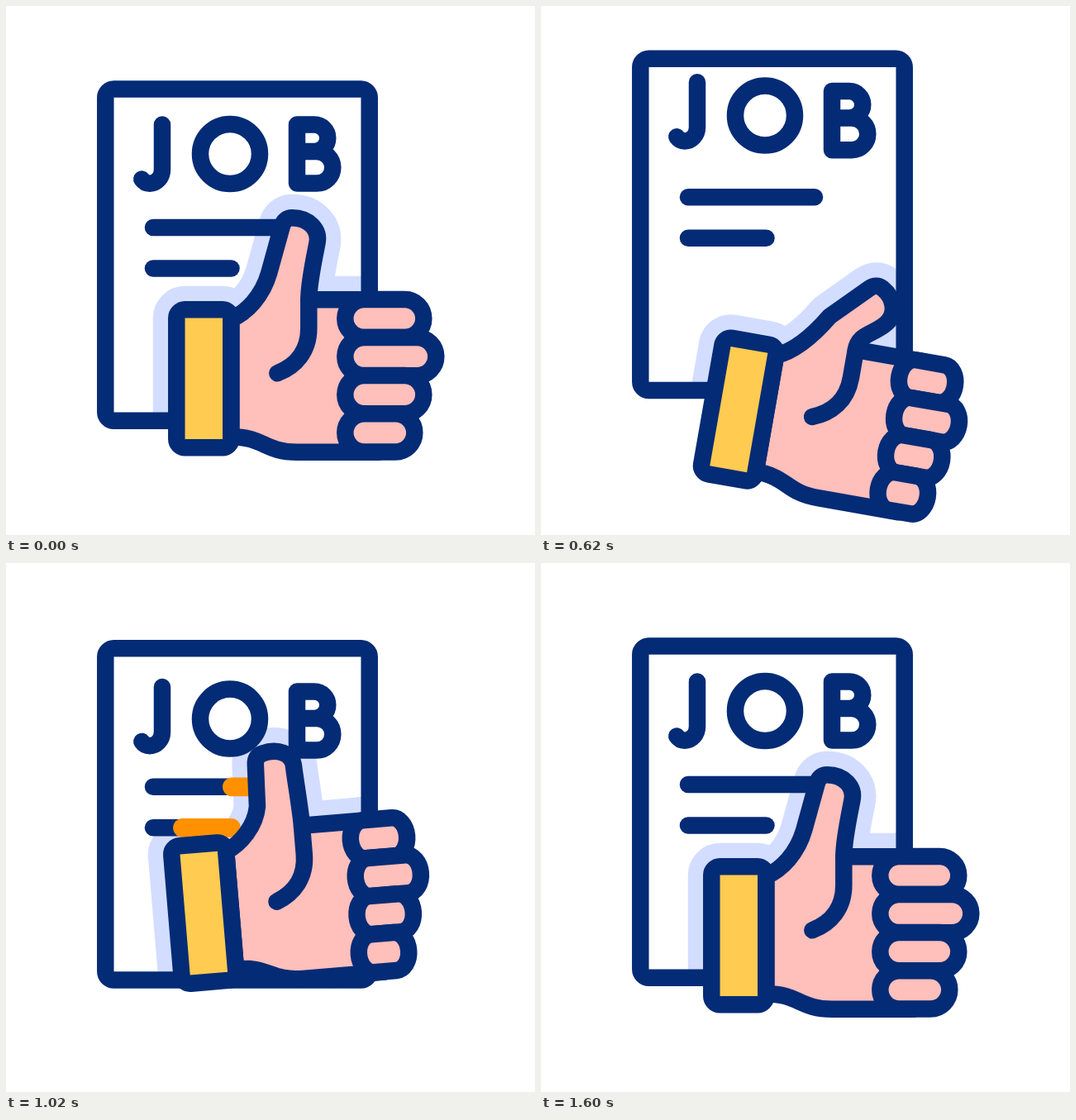
Animation of 640x640 px, one loop 1.96 s. Source, as an HTML page with a canvas:

```html
<!DOCTYPE html>
<html lang="en">
<head>
<meta charset="utf-8">
<title>Job approved</title>
<style>
  html, body { margin: 0; width: 100%; height: 100%; overflow: hidden; background: #fff; }
  canvas { display: block; width: 640px; height: 640px; }
</style>
</head>
<body>
<canvas id="stage" width="640" height="640"></canvas>
<script>
const ctx = document.getElementById('stage').getContext('2d');
const LOOP = 1960, STEP = 20, LINE = 20.5, HALO = 57;
const NAVY = '#042b76', PINK = '#ffbfba', YELLOW = '#ffcb50', PALE = '#d3ddff', ORANGE = '#ff9100';

function ease(x) {
  x = Math.min(1, Math.max(0, x));
  return x * x * (3 - 2 * x);
}

// Starts at rest, eases to each peak in turn and comes back to rest
function swing(t, beats, peaks) {
  let value = 0;
  for (let i = 0; i < beats.length - 1; i++) {
    const step = (peaks[i] || 0) - (peaks[i - 1] || 0);
    value += step * ease((t - beats[i]) / (beats[i + 1] - beats[i]));
  }
  return value;
}

const SHEET_BEATS = [260, 420, 660, 900, 1180, 1450];
const HAND_BEATS = [400, 640, 943, 1202, 1600];
const TILT_BEATS = [366, 600, 880, 1180, 1580];

const sheetY = t => swing(t, SHEET_BEATS, [18, -41, 18, -20.5]);
const letterY = t => swing(t, SHEET_BEATS, [9, -16.5, 10, -6.3]);
const handY = t => swing(t, HAND_BEATS, [38, -41.5, 25.6]);
const thumbBend = t => swing(t, HAND_BEATS, [30, -25, 21.5]);
const handTilt = t => swing(t, TILT_BEATS, [10.3, -14.5, 7.1]);
const fistWidth = t => 1 - 0.28 * (ease((t - 320) / 240) - ease((t - 1200) / 360));
const rad = deg => deg * Math.PI / 180;

function stroke(path, color = NAVY, width = LINE) {
  ctx.strokeStyle = color;
  ctx.lineWidth = width;
  ctx.stroke(path);
}

function shape(path, fill) {
  ctx.fillStyle = fill;
  ctx.fill(path);
  stroke(path);
}

function bar(x0, x1, y, color, width) {
  stroke(new Path2D(`M${x0} ${y}H${x1}`), color, width);
}

// Half the line width as radius: round outside, square inside
function box(x, y, w, h) {
  const path = new Path2D();
  path.roundRect(x, y, w, h, LINE / 2);
  return path;
}

const sheet = box(120.3, 100.5, 319.4, 401.2);
const letters = [
  'M189 143.5V198C189 207.5 182 214.7 174 214.7C169 214.7 166 212 164.3 209.5',
  'M307 179A36 36 0 1 1 235 179A36 36 0 1 1 307 179Z',
  'M352 176V143.5H373A16.2 16.2 0 0 1 373 176H352V214.6H376A19.3 19.3 0 0 0 376 176'
].map(d => new Path2D(d));

// Hand parts are relative to the middle of the cuff
const HAND = { x: 239.3, y: 450.8 };
const cuff = box(-33, -83.5, 66, 167);
const crease = new Path2D('M127 -95V-61C127 -33 111 -15 89 -6.5');

function palmPath(bend) {
  const c = Math.cos(rad(bend)), s = Math.sin(rad(bend));
  const len = 1 + Math.min(0, bend) * 0.008;
  // Turns a point of the thumb around its joint
  const p = (x, y) => {
    const dx = x - 88, dy = (y + 110) * len;
    return [88 + dx * c - dy * s, -110 + dx * s + dy * c];
  };
  const path = new Path2D();
  path.moveTo(33, -72);
  path.bezierCurveTo(52, -80, 71, -100, ...p(79, -128));
  path.lineTo(...p(94.5, -184));
  path.quadraticCurveTo(...p(97.5, -194.5), ...p(107, -194.5));
  path.bezierCurveTo(...p(126, -194.5), ...p(141, -181), ...p(137, -163));
  path.bezierCurveTo(...p(133, -143), 127, -115, 127, -95.5);
  path.lineTo(212, -95.5);
  path.lineTo(212, 89);
  path.lineTo(113, 89);
  path.bezierCurveTo(73, 89, 73, 70.5, 33, 70.5);
  path.closePath();
  return path;
}

// All fingers start at the same left edge and are squeezed about their middles
function fingerPath(half, i, squeeze) {
  const x = 171 + half, y = -72.8 + 46.1 * i, r = 23.1;
  const rx = r * squeeze, w = half * squeeze - rx;
  const path = new Path2D();
  path.ellipse(x + w, y, rx, r, 0, -Math.PI / 2, Math.PI / 2);
  path.ellipse(x - w, y, rx, r, 0, Math.PI / 2, Math.PI * 1.5);
  path.closePath();
  return path;
}

function inHand(t, paint) {
  ctx.save();
  ctx.translate(HAND.x, HAND.y + handY(t));
  ctx.rotate(rad(handTilt(t)));
  paint();
  ctx.restore();
}

function drawRow(t, i) {
  const x = 178, y = 268 + 49.5 * i, span = 153 - 58.5 * i;
  const sweep = start => x + span * ease((t - start - 40 * i) / 240);
  bar(x, x + span, y, NAVY, LINE);
  const head = sweep(640), tail = sweep(880);
  if (head > tail) bar(tail, head, y, ORANGE, 22.8);
}

function drawSheet(t, hand) {
  const y = sheetY(t);
  ctx.save();
  ctx.translate(0, y);

  ctx.save();
  ctx.clip(sheet);
  ctx.translate(0, -y);
  inHand(t, () => hand.forEach(part => {
    ctx.fillStyle = PALE;
    ctx.fill(part);
    stroke(part, PALE, HALO);
  }));
  ctx.restore();

  stroke(sheet);
  drawRow(t, 0);
  drawRow(t, 1);
  letters.forEach((letter, i) => {
    ctx.save();
    ctx.translate(0, letterY(t - 40 * i));
    stroke(letter);
    ctx.restore();
  });
  ctx.restore();
}

function draw(t) {
  ctx.fillStyle = '#fff';
  ctx.fillRect(0, 0, 640, 640);
  ctx.lineCap = ctx.lineJoin = 'round';

  const palm = palmPath(thumbBend(t));
  const squeeze = fistWidth(t);
  const fist = [47.5, 55, 47.5, 42].map((half, i) => fingerPath(half, i, squeeze));

  drawSheet(t, [cuff, palm, ...fist]);
  inHand(t, () => {
    shape(palm, PINK);
    stroke(crease);
    fist.forEach(finger => shape(finger, PINK));
    shape(cuff, YELLOW);
  });
}

const start = performance.now();
function frame() {
  const t = (performance.now() - start) % LOOP;
  draw(Math.floor(t / STEP) * STEP);
  requestAnimationFrame(frame);
}
frame();
</script>
</body>
</html>
```
